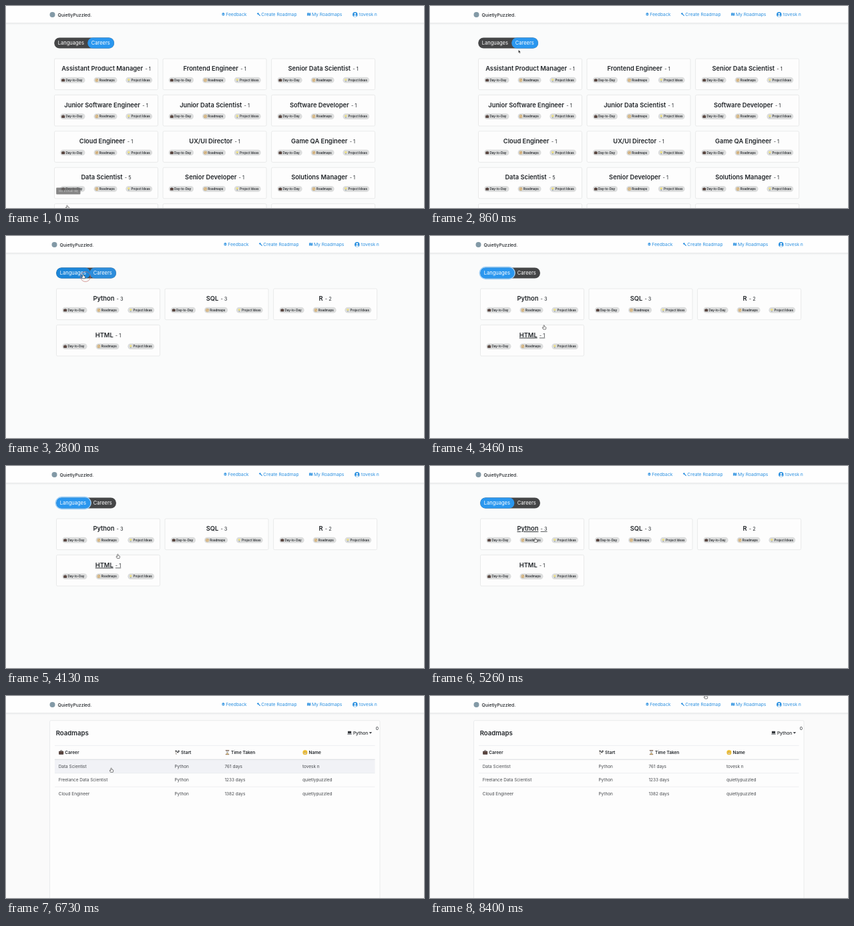
Animation of 626 by 303 pixels, one loop 8460 ms. Source, as an HTML page:

```html
<!DOCTYPE html>
<html lang="en">
<head>
<meta charset="utf-8">
<title>Roadmaps</title>
<style>
  html, body { margin: 0; width: 100%; height: 100%; overflow: hidden; background: #fafbfb; }
  svg { display: block; width: 100vw; height: 100vh; font-family: Inter, Roboto, sans-serif; }
  text { white-space: pre; }
  .name { font-size: 9.3px; font-weight: 600; }
  .count { font-size: 7.3px; }
  .hover tspan { text-decoration: underline; }
  .card { fill: #fdfdfd; stroke: #e1e2e3; stroke-width: .7; }
</style>
</head>
<body>
<svg id="stage" viewBox="0 0 626 303" xmlns="http://www.w3.org/2000/svg"></svg>
<script>
const LOOP = 8460, STEP = 200 / 3;
const BLUE = '#2a97ef', NAV = '#2b90e0', INK = '#212529';

const SYMBOLS = {
  bag: `<path d="M2.8 2V1h2.4v1" fill="none" stroke="#3a3230" stroke-width=".7"/>
    <rect x=".3" y="1.9" width="7.4" height="5.3" rx=".8" fill="#4d3c39"/>
    <path d="M.3 4.3h7.4" stroke="#8a6b58" stroke-width=".6"/>`,
  compass: `<circle cx="4" cy="4" r="3.3" fill="#f3dfb4" stroke="#b08a48" stroke-width="1"/>
    <path d="M5.6 2.2L4.6 4.6 2.4 5.8 3.4 3.4Z" fill="#a5683c"/>`,
  bulb: `<circle cx="4" cy="3.1" r="2.5" fill="#ecdf86"/>
    <path d="M3 5.4h2v1.9H3Z" fill="#84939a"/>`,
  flag: `<path d="M1 1l1.6 6.4" stroke="#6b5a4c" stroke-width=".7"/>
    <path d="M1 1l6-.2 1 3.6-6.1.3Z" fill="#e8e8e8"/>
    <path d="M1 1h2l.5 1.8h-2ZM5 .9h2l.5 1.8h-2ZM3.5 2.8h2L6 4.5H4Z" fill="#2d3033"/>`,
  hourglass: `<path d="M1.8 1h4.4L4.4 4l1.8 3H1.8l1.8-3Z" fill="#cfe2ea" stroke="#8a7060" stroke-width=".5"/>
    <path d="M1.2 .8h5.6M1.2 7.2h5.6" stroke="#75533f" stroke-width=".9"/>
    <path d="M2.4 6.8L4 4.8 5.6 6.8Z" fill="#e0b04c"/>`,
  face: `<circle cx="4" cy="4" r="3.7" fill="#f4c63d"/>
    <path d="M2 4.5h4Q5.6 6.4 4 6.4T2 4.5Z" fill="#fff" stroke="#8a6420" stroke-width=".4"/>
    <circle cx="2.7" cy="3" r=".5" fill="#6b4c1a"/><circle cx="5.3" cy="3" r=".5" fill="#6b4c1a"/>`,
  laptop: `<rect x="1.2" y="1.3" width="5.6" height="3.9" rx=".4" fill="#35383c"/>
    <path d="M.2 5.8h7.6l-.6 1H.8Z" fill="#5d6267"/>`,
  stack: `<path d="M4 .6L7.6 2.3 4 4 .4 2.3Z" fill="${NAV}"/>
    <path d="M1 3.6v2.2Q4 8.2 7 5.8V3.6L4 5Z" fill="${NAV}"/>`,
  wrench: `<path d="M3 3l4 4" stroke="${NAV}" stroke-width="1.7" stroke-linecap="round"/>
    <circle cx="2.4" cy="2.4" r="1.8" fill="${NAV}"/><path d="M0 0h2.2v2.2Z" fill="#fff"/>`,
  map: `<path d="M.2 1.6l2.2-.8v5.6l-2.2.8ZM2.9 .8l2.2.8v5.6l-2.2-.8ZM5.6 1.6l2.2-.8v5.6l-2.2.8Z" fill="${NAV}"/>`,
  user: `<circle cx="4" cy="4" r="3.8" fill="${NAV}"/><circle cx="4" cy="3" r="1.35" fill="#fff"/>
    <path d="M1.6 6.2Q4 3.6 6.4 6.2 4 8 1.6 6.2Z" fill="#fff"/>`
};

const icon = (id, x, y, s) => `<use href="#${id}" x="${x}" y="${y}" width="${s}" height="${s}"/>`;
const text = (x, y, str, size, fill = INK, weight = 400) =>
  `<text x="${x}" y="${y}" font-size="${size}" fill="${fill}" font-weight="${weight}">${str}</text>`;
const rect = (x, y, w, h, attrs) => `<rect x="${x}" y="${y}" width="${w}" height="${h}" ${attrs}/>`;
const line = (y, color, w) => `<path d="M73 ${y}H552.5" stroke="${color}" stroke-width="${w}"/>`;

const CARD = { w: 155, h: 46.6, dx: 162.55, dy: 54.4, x: 72.5, y: 79 };
const careers = [
  ['Assistant Product Manager', 1], ['Frontend Engineer', 1], ['Senior Data Scientist', 1],
  ['Junior Software Engineer', 1], ['Junior Data Scientist', 1], ['Software Developer', 1],
  ['Cloud Engineer', 1], ['UX/UI Director', 1], ['Game QA Engineer', 1],
  ['Data Scientist', 5], ['Senior Developer', 1], ['Solutions Manager', 1],
  ['', ''], ['', ''], ['', '']
];
const languages = [['Python', 3], ['SQL', 3], ['R', 2], ['HTML', 1]];
const tags = [[8.7, 37.3, 'bag', 'Day-to-Day'], [59, 35, 'compass', 'Roadmaps'], [106.8, 39.8, 'bulb', 'Project Ideas']];

const cardPos = i => [CARD.x + CARD.dx * (i % 3), CARD.y + CARD.dy * Math.floor(i / 3)];

function card([name, count], i) {
  const [x, y] = cardPos(i);
  const pills = tags.map(([dx, w, id, label]) =>
    rect(x + dx, y + 27.8, w, 8.7, 'rx="4.35" fill="#dcdddd"') +
    icon(id, x + dx + 1.8, y + 29.5, 5.4) +
    text(x + dx + 8.2, y + 33.8, label, 4.5, '#2c2f33', 600)).join('');
  const title = name && `<text x="${x + CARD.w / 2}" y="${y + 18.2}" text-anchor="middle" fill="${INK}">` +
    `<tspan class="name">${name}</tspan><tspan class="count" dx="3.2">- ${count}</tspan></text>`;
  return `<g class="cell">${rect(x, y, CARD.w, CARD.h, 'rx="1.8" class="card"')}${title}${pills}</g>`;
}

const header = `<g id="header">
  <circle cx="69.5" cy="13" r="4" fill="#8299a6"/>
  ${text(77.6, 15.6, 'QuietlyPuzzled.', 6.75, INK, 500)}
  ${icon('stack', 322.7, 9.7, 5.4)}${text(329.2, 15, 'Feedback', 6.75, NAV)}
  ${icon('wrench', 375.6, 9.7, 5.4)}${text(382.3, 15, 'Create Roadmap', 6.75, NAV)}
  ${icon('map', 450.7, 9.5, 5.8)}${text(457.9, 15, 'My Roadmaps', 6.75, NAV)}
  ${icon('user', 518.8, 8.8, 8)}${text(529, 15, 'tovesk n', 6.75, NAV)}
</g>`;

const toggle = `<g id="toggle">
  ${rect(72.2, 47.5, 89.8, 16, 'rx="8" fill="#454647"')}
  ${rect(71.4, 46.7, 52.6, 17.6, 'rx="8.8" id="glow" fill="none" stroke="#9fd0f8" stroke-width="1.7"')}
  ${rect(72.2, 47.5, 51.2, 16, `rx="8" id="langPill"`)}
  ${rect(122.2, 47.5, 39.8, 16, `rx="8" id="careerPill" fill="${BLUE}"`)}
  ${text(77.8, 58.2, 'Languages', 7.5, '#fff')}${text(127.8, 58.2, 'Careers', 7.5, '#fff')}
</g>`;

const rows = [
  ['Data Scientist', '761 days', 'tovesk n'],
  ['Freelance Data Scientist', '1233 days', 'quietlypuzzled'],
  ['Cloud Engineer', '1382 days', 'quietlypuzzled']
];
const rowTop = i => 95.2 + 20.45 * i;
const heads = [[78.8, 'bag', 'Career'], [252.6, 'flag', 'Start'], [327.6, 'hourglass', 'Time Taken'], [444, 'face', 'Name']];

const roadmaps = rect(0, 0, 626, 303, 'fill="#fafafa"') +
  rect(65.5, 36.7, 494.5, 290, 'rx="2" fill="#fdfdfd" stroke="#e3e4e5" stroke-width=".7"') +
  text(74.7, 58.5, 'Roadmaps', 9.6, INK, 600) +
  icon('laptop', 510.8, 51.5, 7.4) + text(519.9, 57.9, 'Python', 6.6, INK, 500) +
  `<path d="M543.7 54.2h4.4l-2.2 2.4Z" fill="${INK}"/>` + text(553.8, 50.9, '0', 6.7) +
  rows.map((r, i) => rect(73, rowTop(i), 479.5, 20.4, 'class="row" fill="#f1f2f6"')).join('') +
  line(74.4, '#e2e4e7', .6) + line(95.2, '#d9dce0', 1) + line(115.7, '#e2e4e7', .6) + line(136.2, '#e2e4e7', .6) +
  heads.map(([x, id, label]) => icon(id, x, 80.8, 7.8) + text(x + 9.5, 87.1, label, 6.5, INK, 600)).join('') +
  rows.map(([career, time, name], i) => {
    const y = rowTop(i) + 12.6;
    return [[78.7, career], [252.5, 'Python'], [327.5, time], [444, name]]
      .map(([x, s]) => text(x, y, s, 6.45, '#46494d')).join('');
  }).join('');

const stage = document.getElementById('stage');
stage.innerHTML = `<defs>
  ${Object.entries(SYMBOLS).map(([id, body]) => `<symbol id="${id}" viewBox="0 0 8 8">${body}</symbol>`).join('')}
  <linearGradient id="shade" x2="0" y2="1">
    <stop stop-color="#e6e8e9"/><stop offset="1" stop-color="#e6e8e9" stop-opacity="0"/>
  </linearGradient></defs>
  <g id="careers">${careers.map(card).join('')}</g>
  <g id="languages" transform="translate(3 0)">${languages.map(card).join('')}</g>
  ${toggle}
  <g id="roadmaps">${roadmaps}</g>
  ${rect(0, 25, 626, 3.6, 'fill="url(#shade)"')}${rect(0, 0, 626, 25, 'fill="#fefefe"')}
  ${header}
  <g id="tip">${rect(75.2, 272.4, 36.2, 10.2, 'rx="1" fill="#686868" fill-opacity=".8"')}
    ${text(78.4, 279, 'See a usual day', 4, '#c9c9c9')}</g>
  <circle id="ring" fill="none" stroke="#c4706a" stroke-width=".9"/>
  <g id="cursor">
    <path id="hand" d="M-.8 .6Q0-.5 .8 .6V2.4L2.5 2.8Q3.3 3 3.2 4L2.6 6.3H-1L-2.4 4Q-2.4 3-1.6 3.4L-.8 4Z"
      fill="#fff" stroke="#3a3a3a" stroke-width=".65" stroke-linejoin="round"/>
    <path id="arrow" d="M0 0V4.6L1.1 3.7 1.9 5.4 2.7 5 1.9 3.4H3.3Z" fill="#111" stroke="#fff" stroke-width=".35"/>
  </g>`;

const el = id => document.getElementById(id);
const cells = { careers: [...el('careers').children], languages: [...el('languages').children] };
const rowEls = [...document.querySelectorAll('.row')];
const show = (node, on) => node.setAttribute('display', on ? 'inline' : 'none');
const clamp = v => Math.max(0, Math.min(1, v));
const ramp = (t, a, b) => clamp((t - a) / (b - a));

// time, x, y of the pointer tip
const path = [
  [0, 91.5, 299], [867, 132.5, 65.8], [933, 132.5, 65.8], [1133, 129, 67], [1400, 129, 67],
  [1933, 116.5, 58], [2133, 116.5, 58], [2200, 115.5, 57.5], [2867, 115.5, 57.5],
  [3600, 176, 141], [4133, 167.4, 132.2], [4700, 148, 121], [5266, 157.6, 108],
  [7100, 157.6, 108], [7101, 255, 66], [7467, 255, 66], [7667, 412.6, -2.2], [LOOP + 10, 412.6, -2.2]
];
const clicks = [[2600, 119, 61], [5866, 160.5, 111.5]];

function pointer(t) {
  const i = path.findIndex(p => p[0] > t);
  const [t0, x0, y0] = path[i - 1], [t1, x1, y1] = path[i];
  const p = (t - t0) / (t1 - t0), e = p * p * (3 - 2 * p);
  return [x0 + (x1 - x0) * e, y0 + (y1 - y0) * e];
}

function draw(time) {
  const t = Math.floor((time % LOOP + 7) / STEP) * STEP;
  const page = t < 2730 ? 'careers' : t < 6130 ? 'languages' : 'roadmaps';
  const shift = page === 'languages' ? 3 : 0;
  for (const id of ['careers', 'languages', 'roadmaps']) show(el(id), id === page);
  for (const id of ['header', 'toggle']) el(id).setAttribute('transform', `translate(${shift} 0)`);
  show(el('toggle'), page !== 'roadmaps');

  // toggle colours
  const lit = ramp(t, 2733, 2933);
  el('langPill').setAttribute('fill', lit < 1 ? '#1c86d9' : BLUE);
  el('langPill').setAttribute('opacity', ramp(t, 2600, 2780));
  el('careerPill').setAttribute('opacity', 1 - lit * lit);
  el('glow').setAttribute('opacity', ramp(t, 2800, 2950) - ramp(t, 4450, 4600));

  // hover
  const [x, y] = pointer(t), hx = x + 1 - shift, hy = y + 2.5;
  let hand = (hy > 47 && hy < 64 && hx > 72 && hx < 162 && page !== 'roadmaps') || (hy < 20 && hx > 322);
  for (const [i, cell] of (cells[page] || []).entries()) {
    const [cx, cy] = cardPos(i);
    const over = hx > cx && hx < cx + CARD.w && hy > cy && hy < cy + CARD.h;
    cell.firstElementChild.nextElementSibling.classList.toggle('hover', over);
    hand ||= over;
  }
  rowEls.forEach((row, i) => {
    const over = page === 'roadmaps' && hx > 73 && hx < 552 && hy > rowTop(i) && hy < rowTop(i + 1);
    show(row, over);
    hand ||= over;
  });
  show(el('hand'), hand);
  show(el('arrow'), !hand);
  el('cursor').setAttribute('transform', `translate(${x} ${y})`);
  el('tip').setAttribute('opacity', 1 - ramp(t, 60, 270));

  // click ripple
  const click = clicks.find(([s]) => t >= s && t < s + 400);
  show(el('ring'), !!click);
  if (click) {
    const p = (t - click[0]) / 400;
    el('ring').setAttribute('cx', click[1]);
    el('ring').setAttribute('cy', click[2]);
    el('ring').setAttribute('r', 4 + 7 * p);
    el('ring').setAttribute('opacity', 1 - p * p);
  }
}

const start = performance.now();
function frame() {
  draw(performance.now() - start);
  requestAnimationFrame(frame);
}
draw(0);
requestAnimationFrame(frame);
</script>
</body>
</html>
```
